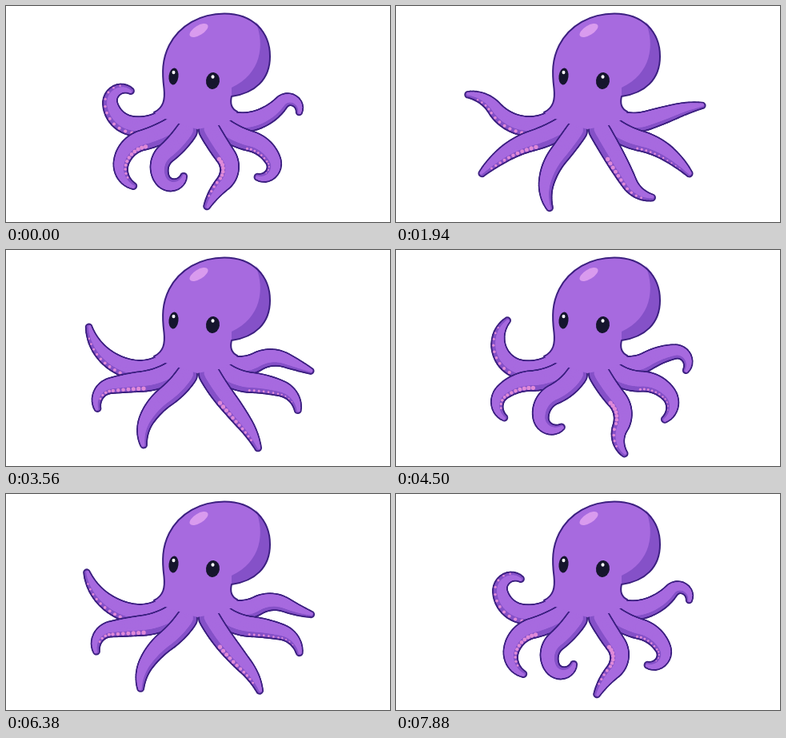
Write an HTML page with a canvas that moves like this. It is 480 by 270 pixels and loops after 7.95 s.

```html
<!DOCTYPE html>
<html lang="en">
<head>
<meta charset="utf-8">
<title>Octopus</title>
<style>
html, body { margin: 0; width: 100%; height: 100%; overflow: hidden; background: #fff; }
canvas { display: block; }
</style>
</head>
<body>
<canvas id="stage" width="480" height="270"></canvas>
<script>
const ctx = document.getElementById('stage').getContext('2d');
const LOOP = 7950, STEP = 62.5, SAMPLES = 36;
const BASE = '#a76adf', SHADE = '#8551c8', LINE = '#3c2080', PINK = '#e08ad8', EYE = '#15152d';

const TIMELINE = [[0, 'curled'], [437, 'stretched'], [1250, 'spread'], [2690, 'lifted'],
  [3280, 'spread'], [4500, 'hooked'], [5630, 'hanging'], [6350, 'spread'],
  [7130, 'hooked'], [7880, 'curled'], [LOOP, 'curled']];

const mix = (a, b, k) => a + (b - a) * k;
const mixAll = (a, b, k) => a.map((v, i) => mix(v, b[i], k));

// Each pose gives the heading in degrees at one third, two thirds and the tip
// of an arm; the heading at the root and the length never change.
const arms = [];
function addArm(look, poses) {
  poses.stretched = mixAll(poses.curled, poses.spread, 1.25);
  arms.push({ ...look, poses });
}

// Back to front. side: which side of the arm carries the suckers
addArm({ x: 198, y: 142, heading: 150, length: 122, width: 13.5, side: -1, suckers: .6 }, {
  curled: [190, 260, 400], spread: [192, 222, 255], lifted: [190, 245, 95],
  hooked: [190, 255, 320], hanging: [190, 262, 295] });
addArm({ x: 278, y: 143, heading: 15, length: 108, width: 13, side: 1, suckers: 0 }, {
  curled: [-20, -50, 110], spread: [-28, 25, 15], lifted: [-5, -68, -30],
  hooked: [-30, -8, 130], hanging: [-20, -35, 80] });
addArm({ x: 208, y: 152, heading: 150, length: 117, width: 14, side: -1, suckers: .7 }, {
  curled: [165, 105, 20], spread: [175, 172, 70], lifted: [150, 115, 205],
  hooked: [178, 140, 30], hanging: [140, 110, 140] });
addArm({ x: 270, y: 152, heading: 35, length: 114, width: 14, side: 1, suckers: .4 }, {
  curled: [15, 65, 205], spread: [5, 15, 85], lifted: [25, 60, 10],
  hooked: [0, 50, 150], hanging: [25, 70, 62] });
addArm({ x: 226, y: 156, heading: 125, length: 108, width: 14, side: -1, suckers: 0 }, {
  curled: [140, 60, -80], spread: [142, 122, 85], lifted: [112, 80, 40],
  hooked: [155, 85, -40], hanging: [118, 65, 0] });
addArm({ x: 254, y: 155, heading: 60, length: 111, width: 14, side: 1, suckers: .7 }, {
  curled: [55, 135, 115], spread: [52, 48, 72], lifted: [70, 75, -75],
  hooked: [50, 115, 45], hanging: [55, 118, 92] });

// Walk along the arm, turning evenly between the headings
function centreLine({ x, y, heading, length, width }, pose) {
  const turns = [heading, ...pose], line = [];
  const step = length / SAMPLES;
  for (let n = 0; n <= SAMPLES; n++) {
    const t = n / SAMPLES, s = Math.min(t * 3, 2.999), i = Math.floor(s);
    const a = mix(turns[i], turns[i + 1], s - i) * Math.PI / 180;
    const dx = Math.cos(a), dy = Math.sin(a);
    line.push({ x, y, t, nx: -dy, ny: dx, h: width * (1 - .64 * t ** 2.5) });
    x += dx * step;
    y += dy * step;
  }
  return line;
}

// Tapered stroke, moved sideways by shift(p)
function taper(line, color, half, shift = () => 0) {
  ctx.strokeStyle = color;
  for (let n = 1; n < line.length; n++) {
    const a = line[n - 1], b = line[n], sa = shift(a), sb = shift(b);
    ctx.lineWidth = 2 * half(b);
    ctx.beginPath();
    ctx.moveTo(a.x + a.nx * sa, a.y + a.ny * sa);
    ctx.lineTo(b.x + b.nx * sb, b.y + b.ny * sb);
    ctx.stroke();
  }
}

function disc(x, y, rx, ry, turn, color) {
  ctx.fillStyle = color;
  ctx.beginPath();
  ctx.ellipse(x, y, rx, ry, turn, 0, 7);
  ctx.fill();
}

function drawArm(arm, pose) {
  const { side, suckers } = arm, line = centreLine(arm, pose);
  const rim = p => p.h * .16 * (1 + .5 * suckers);
  taper(line, LINE, p => p.h);
  taper(line, SHADE, p => p.h - 1.9);
  for (let n = 12; suckers && n < 33; n += 2) {
    const p = line[n], r = suckers * p.h * .28, off = side * (p.h - 1.9 - r);
    disc(p.x + p.nx * off, p.y + p.ny * off, r, r, 0, PINK);
  }
  taper(line, BASE, p => p.h - 1.9 - rim(p), p => -side * rim(p));
}

const outline = 'M185 133C197 127 199 117 197.5 103C195 83 195 67 204 49C217 24 243 9.5 273 9.5' +
  'C308 9.5 330 32 330 63C330 92 311 109 282 113C280 121 281 128 289 132';
const headLine = new Path2D(outline);
const body = new Path2D(outline + 'L285 141L266 149L239 154L213 146L194 139Z');
const headShade = new Path2D('M312 20C324 48 319 85 282 102V113C311 109 330 92 330 63C330 44 323 30 312 20Z');

function drawHead() {
  ctx.fillStyle = BASE;
  ctx.fill(body);
  ctx.fillStyle = SHADE;
  ctx.fill(headShade);
  ctx.strokeStyle = LINE;
  ctx.lineWidth = 2;
  ctx.stroke(headLine);
  disc(241, 30.5, 13, 6, -.55, '#d99bee');
  for (const [x, y, rx] of [[209.5, 88, 6], [258.5, 93.5, 8.5]]) {
    disc(x, y, rx, 10.5, .12, EYE);
    disc(x, y - 5, 2, 2.3, 0, '#fff');
  }
}

function draw(now) {
  const t = Math.floor(now % LOOP / STEP + 1e-6) * STEP;
  const i = TIMELINE.findIndex(([time]) => time > t);
  const [t0, from] = TIMELINE[i - 1], [t1, to] = TIMELINE[i];
  const k = (1 - Math.cos(Math.PI * (t - t0) / (t1 - t0))) / 2;
  ctx.fillStyle = '#fff';
  ctx.fillRect(0, 0, 480, 270);
  ctx.lineCap = ctx.lineJoin = 'round';
  for (const arm of arms) drawArm(arm, mixAll(arm.poses[from], arm.poses[to], k));
  drawHead();
}

const start = performance.now();
function tick() {
  draw(performance.now() - start);
  requestAnimationFrame(tick);
}
tick();
</script>
</body>
</html>
```
